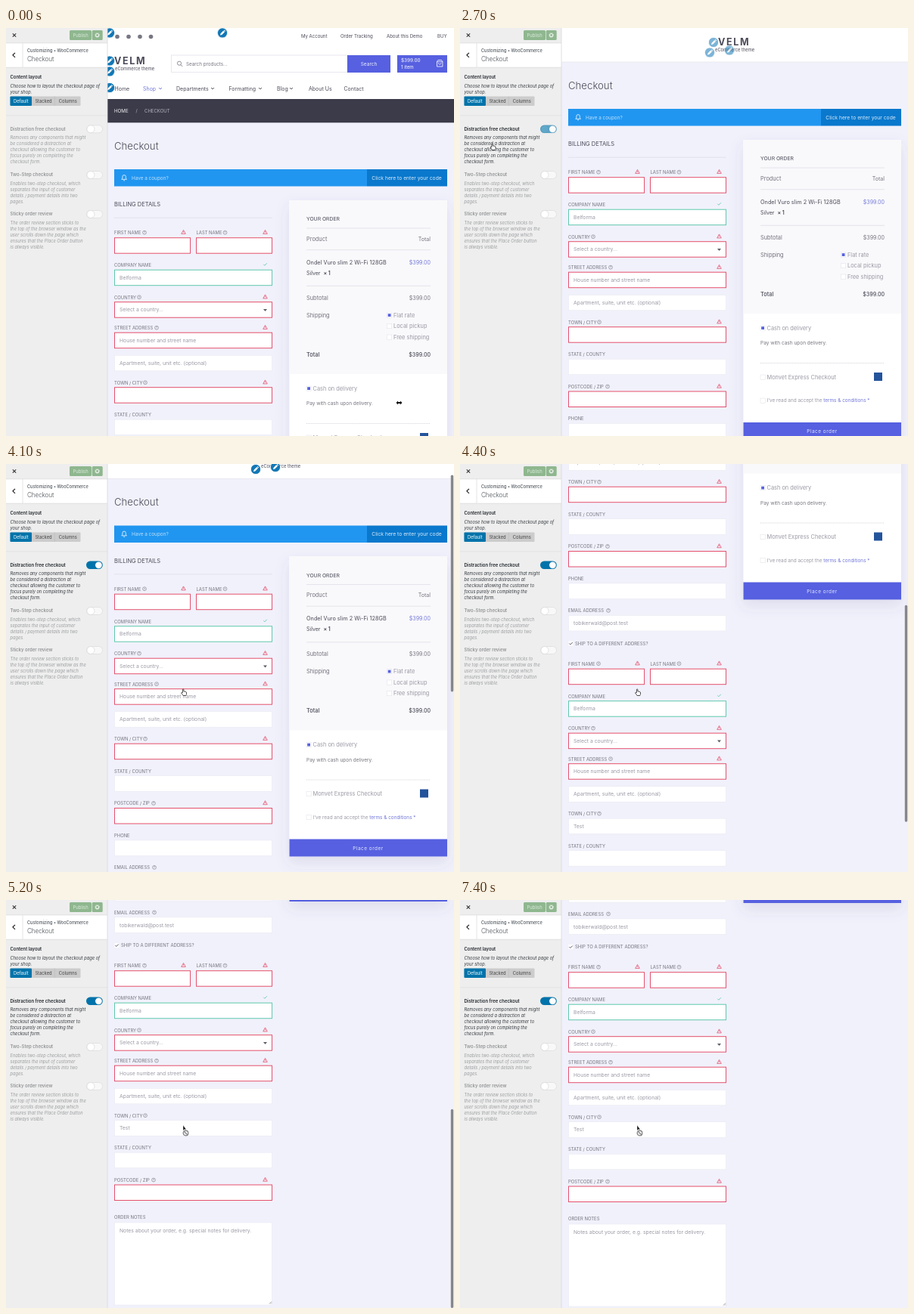
Animation of 592 by 540 pixels, one loop 7500 ms. Source, as an HTML page:

```html
<!DOCTYPE html>
<html lang="en">
<head>
<meta charset="utf-8">
<title>Checkout customizer</title>
<style>
  html, body { margin: 0; width: 100%; height: 100%; overflow: hidden; background: #f1f1fb; }
  svg { display: block; width: 592px; height: 540px; }
  text { font-family: Inter, "Open Sans", sans-serif; white-space: pre; }
</style>
</head>
<body>
<svg id="stage" viewBox="0 0 592 540" xmlns="http://www.w3.org/2000/svg"></svg>
<script>
const LOOP = 7500, STEP = 100;
const INK = '#4b4b59', SOFT = '#74747f', PALE = '#9a9aa6', RULE = '#dfdfe8';
const VIOLET = '#5660e0', LINK = '#7378d8', RED = '#e5506c', GREEN = '#5fc9ad', BLUE = '#0073aa';

// Text is placed by the vertical centre of its capitals.
const text = (x, cy, str, size, fill = SOFT, more = '') =>
  `<text x="${x}" y="${(cy + size * 0.36).toFixed(2)}" font-size="${size}" fill="${fill}" ${more}>${str}</text>`;
const rect = (x, y, w, h, fill, more = '') =>
  `<rect x="${x}" y="${y}" width="${w}" height="${h}" fill="${fill}" ${more}/>`;
const path = (d, stroke, width = 1, more = '') =>
  `<path d="${d}" fill="none" stroke="${stroke}" stroke-width="${width}" ${more}/>`;
const circle = (x, y, r, fill, more = '') => `<circle cx="${x}" cy="${y}" r="${r}" fill="${fill}" ${more}/>`;
const rule = (x1, x2, y, color = RULE, more = '') => path(`M${x1} ${y}H${x2}`, color, 0.8, more);
const END = 'text-anchor="end"', MID = 'text-anchor="middle"';

const chevron = (x, y, c = SOFT) => path(`M${x - 2} ${y - 1}l2 2l2 -2`, c, 0.9);
const help = (x, y) => circle(x, y, 2.4, 'none', `stroke="${SOFT}" stroke-width=".6"`) +
  text(x, y, '?', 3.8, SOFT, MID);
const warn = (x, y) => path(`M${x} ${y - 2.6}l2.8 5h-5.6z`, RED, 0.8, 'stroke-linejoin="round"') +
  path(`M${x} ${y - 0.8}v1.6`, RED, 0.7);
const tick = (x, y, c) => path(`M${x - 2.2} ${y}l1.5 1.5l3 -3`, c, 0.9);
const pencil = (x, y) => `<g transform="translate(${x} ${y})">` +
  circle(0, 0, 6.6, '#1277b5', 'stroke="#fff" stroke-width=".8"') +
  `<path d="M-3 3l.6 -2.2l3.7 -3.7l1.7 1.7l-3.7 3.7zM1.8 -3.4l.8 -.7l1.6 1.6l-.7 .8z" fill="#fff"/></g>`;

function box(x, y, w, color, hint = '', h = 20.5) {
  const stroke = color || '#e9e9f3';
  return rect(x + 0.5, y, w - 1, h, '#fff', `stroke="${stroke}" stroke-width="${color ? 1 : 0.6}"`) +
    (hint && text(x + 7, y + 10.2, hint, 6.8, PALE));
}

// One labelled full-width field; `mark` is the x of the help icon.
function field(y, label, { mark, state, hint, gap = 6.2 } = {}) {
  const color = { bad: RED, good: GREEN }[state];
  return text(143, y, label, 5.9, SOFT) + (mark ? help(mark, y - 0.3) : '') +
    (state === 'bad' ? warn(342.5, y - 1) : state === 'good' ? tick(342.5, y - 1.2, GREEN) : '') +
    box(143, y + gap, 209, color, hint);
}

function address(dy, town) {
  const y = 191 + dy;
  return text(143, y, 'FIRST NAME', 5.9) + help(183, y - 0.3) + warn(234.5, y - 1) + box(143, y + 6.7, 101, RED) +
    text(251.5, y, 'LAST NAME', 5.9) + help(289.5, y - 0.3) + warn(342.5, y - 1) + box(251, y + 6.7, 101, RED) +
    field(y + 43, 'COMPANY NAME', { state: 'good', hint: 'Belforma' }) +
    field(y + 85.5, 'COUNTRY', { mark: 176, state: 'bad', hint: 'Select a country…' }) +
    `<path d="M340 ${y + 101}h5l-2.5 3z" fill="#5c5c68"/>` +
    field(y + 126, 'STREET ADDRESS', { mark: 199, state: 'bad', hint: 'House number and street name' }) +
    box(143, y + 162.3, 209, null, 'Apartment, suite, unit etc. (optional)') +
    field(y + 198.5, 'TOWN / CITY', town) +
    field(y + 241, 'STATE / COUNTY') +
    field(y + 283.8, 'POSTCODE / ZIP', { mark: 195, state: 'bad' });
}

function choice(x, cy, label, on, size = 7.4) {
  return rect(x - 9, cy - 3, 6.2, 6.2, '#fff', 'stroke="#e4e4ee" stroke-width=".6"') +
    (on ? rect(x - 7.8, cy - 1.8, 3.8, 3.8, VIOLET) : '') + text(x - 0.5, cy, label, size, PALE);
}

function orderCard() {
  const row = (y, name, sum, more = '', color = SOFT) =>
    text(397, y, name, 7.4, color, more) + text(561, y, sum, 7.05, color, END + ' ' + more);
  return rect(374.5, 148, 208.5, 397, '#fff', 'filter="url(#shade)"') +
    rect(374.5, 148, 208.5, 230, '#f9f9fb') +
    text(397, 173, 'YOUR ORDER', 6.8, INK) + rule(397, 561, 185) +
    row(199, 'Product', 'Total') + rule(397, 561, 213.7) +
    text(397, 230, 'Ondel Vuro slim 2 Wi-Fi 128GB', 7.3, INK) +
    text(397, 244.3, 'Silver&#160; <tspan font-weight="600">× 1</tspan>', 7, INK) +
    text(561, 230, '$399.00', 7.05, LINK, END) + rule(397, 561, 261.3) +
    row(277, 'Subtotal', '$399.00') + text(397, 300, 'Shipping', 7.4) +
    choice(512.5, 300, 'Flat rate', true) + choice(512.5, 314.5, 'Local pickup') +
    choice(512.5, 329, 'Free shipping') +
    row(352, 'Total', '$399.00', 'font-weight="500"', INK) +
    choice(406, 397, 'Cash on delivery', true) +
    text(397, 417, 'Pay with cash upon delivery.', 6.5, SOFT) +
    rule(397, 561, 443.5, '#c9c9d2', 'stroke-dasharray="1 1"') +
    choice(406, 462, 'Monvet Express Checkout') + rect(547, 456, 11, 11, '#24549b') +
    choice(406, 493, `I’ve read and accept the <tspan fill="${LINK}">terms &amp; conditions *</tspan>`, false, 6.4) +
    rect(374.5, 522, 208.5, 23, VIOLET) +
    text(478.5, 533.7, 'Place order', 6.5, '#e4e6ff', MID + ' letter-spacing=".5"');
}

function content() {
  return text(143, 76, 'Checkout', 13.2, INK, 'font-weight="300"') +
    rect(143, 107, 334, 22.5, '#2196f0') + rect(477, 107, 106, 22.5, '#0a78cc') +
    path('M152.8 120.3h6.6l-1.1 -1.5v-2a2.2 2.2 0 0 0 -4.4 0v2zM155.2 121.8h1.8', '#e3f2ff', 0.9) +
    text(166, 118.2, 'Have a coupon?', 6.4, '#bfe0fc') +
    text(529.5, 118.2, 'Click here to enter your code', 6.75, '#d7ebfb', MID) +
    text(143, 153.5, 'BILLING DETAILS', 7.5, INK) + rule(143, 352, 171.3) +
    address(0, { mark: 184, state: 'bad' }) +
    field(517.3, 'PHONE') +
    field(559.7, 'EMAIL ADDRESS', { mark: 196, hint: 'tobikerwald@post.test' }) +
    rect(143.5, 600, 6, 6, '#fff') + tick(146.5, 603, INK) +
    text(152, 603, 'SHIP TO A DIFFERENT ADDRESS?', 6) +
    address(439, { mark: 184, hint: 'Test' }) +
    text(143, 963, 'ORDER NOTES', 5.9) +
    box(143, 970, 209, null, 'Notes about your order, e.g. special notes for delivery.', 109) +
    path('M348 1077.5l3 -3M350 1077.5l1 -1', SOFT, 0.7) + orderCard();
}

function shopHeader() {
  const nav = [['Home', 143.5], ['Shop', 181, 204], ['Departments', 225, 273], ['Formatting', 294.5, 336],
    ['Blog', 358, 377], ['About Us', 400], ['Contact', 446.5]];
  const top = [['My Account', 390], ['Order Tracking', 442], ['About this Demo', 503], ['BUY', 570]];
  return rect(134, 0, 458, 94, '#fff') +
    [147, 162, 177, 191.5].map(x => circle(x, 11.5, 2.8, '#777783')).join('') +
    top.map(([s, x]) => text(x, 11.3, s, 6.05, INK)).join('') +
    text(143, 43.5, 'VELM', 12.5, INK, 'font-weight="700" letter-spacing="1.7"') +
    text(144, 53.5, 'eCommerce theme', 5.8, INK) +
    rect(218.5, 36, 233, 22.5, '#fff', 'stroke="#e2e2ec" stroke-width=".8"') +
    circle(229, 46.7, 2.6, 'none', `stroke="${SOFT}" stroke-width=".8"`) + path('M231 48.7l2.2 2.2', SOFT, 0.9) +
    text(238, 47.3, 'Search products...', 6.3, SOFT) +
    rect(451, 36, 57, 23, VIOLET) + text(479.5, 47.3, 'Search', 6.5, '#eef', MID) +
    rect(517, 36, 66, 23, VIOLET) + text(522, 43, '$399.00', 6.4, '#fff') + text(522, 51.8, '1 item', 6.2, '#fff') +
    path('M569.5 44.5l1.4 -2h4.6l1.4 2v6.5h-7.4zM569.5 44.7h7.4M571.4 46.3a1.8 1.8 0 0 0 3.6 0', '#fff', 0.8) +
    nav.map(([s, x, c]) => {
      const color = s === 'Shop' ? LINK : INK;
      return text(x, 80, s, 7, color) + (c ? chevron(c, 80, color) : '');
    }).join('') +
    rect(134, 94, 458, 31.3, '#3c3b49') + text(143, 110, 'HOME', 6.2, '#f2f2f6') +
    text(171.5, 110, '/', 6.2, '#b4b4c0') + text(183, 110, 'CHECKOUT', 6, '#b4b4c0') +
    [[137, 6.5], [286, 6.5], [137, 43.5], [137, 57.5], [137, 79]].map(p => pencil(...p)).join('');
}

function slimHeader() {
  return rect(134, -20, 458, 65, '#fff') + rule(134, 592, 45, '#e6e6ef') +
    text(341, 18.7, 'VELM', 12.5, INK, 'font-weight="700" letter-spacing="1.7"') +
    text(337, 28.7, 'eCommerce theme', 5.8, INK) +
    `<g id="marks">${[[335, 19], [330, 32.5], [356, 29.5]].map(p => pencil(...p)).join('')}</g>`;
}

function option(id, y, title, lines) {
  return `<g id="${id}" opacity=".45">` + text(5.5, y, title, 6, '#23282d', 'font-weight="600"') +
    lines.map((s, i) => text(5.5, y + 11.8 + i * 8, s, 5.7, '#32373c', 'font-style="italic"')).join('') + '</g>';
}
const toggle = y => rect(106.5, y - 5, 21, 10, '#f8f8f8', 'rx="5" stroke="#dcdcdc" stroke-width=".7"') +
  circle(112, y, 5, '#fff', 'stroke="#d8d8d8" stroke-width=".7"');

function sidebar() {
  return rect(0, 0, 134, 540, '#eee') + rect(0, 20, 134, 32, '#fff') +
    rule(0, 134, 19.8, '#ddd') + rule(0, 134, 52.2, '#ddd') + path('M22 20v32', '#ddd', 0.8) +
    path('M8.8 7.3l4.4 4.4m0 -4.4l-4.4 4.4', '#333', 1.1) + path('M12 32.8l-3 3l3 3', '#222', 1.2) +
    rect(84, 3, 29, 13, '#8fb78f', 'rx="1.5"') + text(98.6, 9.6, 'Publish', 5.8, '#dcebdc', MID) +
    rect(113.7, 3, 14, 13, '#8fb78f', 'rx="1.5"') +
    circle(120.6, 9.5, 2, 'none', 'stroke="#e8f2e8" stroke-width="1.1"') +
    circle(120.6, 9.5, 2.9, 'none', 'stroke="#e8f2e8" stroke-width=".8" stroke-dasharray="1.1 1.18"') +
    text(28, 30, 'Customizing • WooCommerce', 5.6, '#50565c', 'font-weight="500"') +
    text(28, 41.3, 'Checkout', 8.3, '#50565c', 'font-weight="300" letter-spacing="-.2"') +
    text(5.5, 65, 'Content layout', 5.9, '#23282d', 'font-weight="600"') +
    ['Choose how to layout the checkout page of', 'your shop.']
      .map((s, i) => text(5.5, 76.5 + i * 8, s, 5.75, '#32373c', 'font-style="italic"')).join('') +
    rect(5.5, 90.5, 93, 12.5, '#ccc', 'rx="1"') + rect(5.5, 90.5, 28.5, 12.5, BLUE, 'rx="1"') +
    path('M64.3 90.5v12.5', '#bdbdbd', 0.6) + text(19.8, 97, 'Default', 5.8, '#fff', MID) +
    text(49.5, 97, 'Stacked', 5.8, '#444', MID) + text(81.8, 97, 'Columns', 5.8, '#444', MID) +
    rule(0, 134, 115.8, '#e0e0e0') +
    option('free', 133.5, 'Distraction free checkout', ['Removes any components that might',
      'be considered a distraction at', 'checkout allowing the customer to', 'focus purely on completing the', 'checkout form.']) +
    option('two', 194, 'Two-Step checkout', ['Enables two-step checkout, which',
      'separates the input of customer', 'details / payment details into two', 'pages.']) +
    option('sticky', 246, 'Sticky order review', ['The order review section sticks to',
      'the top of the browser window as the', 'user scrolls down the page which', 'ensures that the Place Order button', 'is always visible.']) +
    [133.8, 194.5, 246.5].map(toggle).join('') +
    '<g id="on">' + rect(106, 128.6, 21.8, 10.4, BLUE, 'rx="5.2"') + circle(122.4, 133.8, 4.4, '#fff') + '</g>' +
    path('M134 0v540', '#d9d9dd', 0.8);
}

const cursors = {
  drag: '<path d="M-4 0l2.5 -2.6v1.5h3v-1.5l2.5 2.6l-2.5 2.6v-1.5h-3v1.5z" fill="#111"/>',
  hand: '<path d="M-1.6 -4.2q.8 -.8 1.5 0v2.6q2.6 .1 3.6 1.3v2.3q-.2 1 -.8 2h-3.6q-1.4 -2 -2.6 -3.6q.3 -1.1 1.9 -.2z" fill="#fff" stroke="#222" stroke-width=".8"/>',
  denied: '<path d="M-1 -4.5v7.2l1.6 -1.5h2.6z" fill="#111" stroke="#fff" stroke-width=".4"/>' +
    circle(2.5, 6, 3.4, '#e9e9ee', 'stroke="#777" stroke-width="1.1"') + path('M.3 3.8l4.4 4.4', '#777', 1.1)
};

document.getElementById('stage').innerHTML =
  `<defs><filter id="shade" x="-20%" y="-20%" width="140%" height="140%">
    <feDropShadow dx="0" dy="8" stdDeviation="9" flood-color="#50508c" flood-opacity=".13"/></filter>
    <clipPath id="frame"><rect x="134" y="0" width="458" height="540"/></clipPath></defs>` +
  rect(0, 0, 592, 540, '#f1f1fb') +
  `<g clip-path="url(#frame)"><g id="page">${content()}</g><g id="shop">${shopHeader()}</g>
   <g id="slim">${slimHeader()}</g></g>` +
  rect(587.8, 0, 3.4, 287, '#85858c', 'id="bar" rx="1.7"') + sidebar() +
  `<g id="cursor">${Object.entries(cursors).map(([k, s]) => `<g id="${k}">${s}</g>`).join('')}</g>`;

const $ = id => document.getElementById(id);
const show = (id, on) => $(id).setAttribute('display', on ? 'inline' : 'none');
const move = (id, x, y) => $(id).setAttribute('transform', `translate(${x} ${y})`);
const fade = (id, v) => $(id).setAttribute('opacity', v);
const smooth = u => u * u * (3 - 2 * u);
const linear = u => u;

// Value of column `col` in a table of [time, ...values].
function at(keys, t, col = 1, ease = linear) {
  const i = keys.findIndex(k => k[0] > t);
  if (i === 0) return keys[0][col];
  if (i < 0) return keys[keys.length - 1][col];
  const a = keys[i - 1], b = keys[i];
  return a[col] + (b[col] - a[col]) * ease((t - a[0]) / (b[0] - a[0]));
}

const POINTER = [[0, 519.5, 496], [100, 519.5, 496], [1200, 112, 230], [1700, 112, 230], [2300, 117, 136],
  [2500, 117, 136], [2700, 43.5, 157.5], [3200, 43.5, 157.5], [3900, 235, 302.5]];
const SCROLL = [[4000, 0], [4100, 25.5], [4200, 130], [4300, 255], [4400, 365.5], [4500, 440], [4600, 490],
  [4700, 520], [4800, 536], [4900, 543], [5200, 543], [5700, 541]];
const MARKS = [[2500, 0], [2700, 0.55], [2900, 1]];
const BAR = [[4000, 0], [4100, 1], [5700, 1], [5900, 0]];
const SWITCH = [[2400, 0.3], [2700, 0.62], [2900, 1]];

function render(t) {
  const on = t >= 2500, slim = t >= 2600, y = at(SCROLL, t);
  show('shop', !slim);
  show('slim', slim);
  move('page', 0, slim ? -y : 80);
  move('slim', 0, -y);
  fade('marks', at(MARKS, t));
  show('on', on);
  fade('on', at(SWITCH, t));
  fade('free', on ? 1 : 0.45);
  const top = 1.5 + y * 0.507;
  $('bar').setAttribute('y', top);
  $('bar').setAttribute('height', Math.min(287, 540 - top));
  fade('bar', at(BAR, t));
  move('cursor', at(POINTER, t, 1, smooth), at(POINTER, t, 2, smooth));
  const kind = t < 100 ? 'drag' : t < 4700 ? 'hand' : 'denied';
  Object.keys(cursors).forEach(k => show(k, k === kind));
}

const start = performance.now();
function tickClock() {
  const t = (performance.now() - start) % LOOP;
  render(Math.floor(t / STEP) * STEP);
  requestAnimationFrame(tickClock);
}
tickClock();
</script>
</body>
</html>
```
